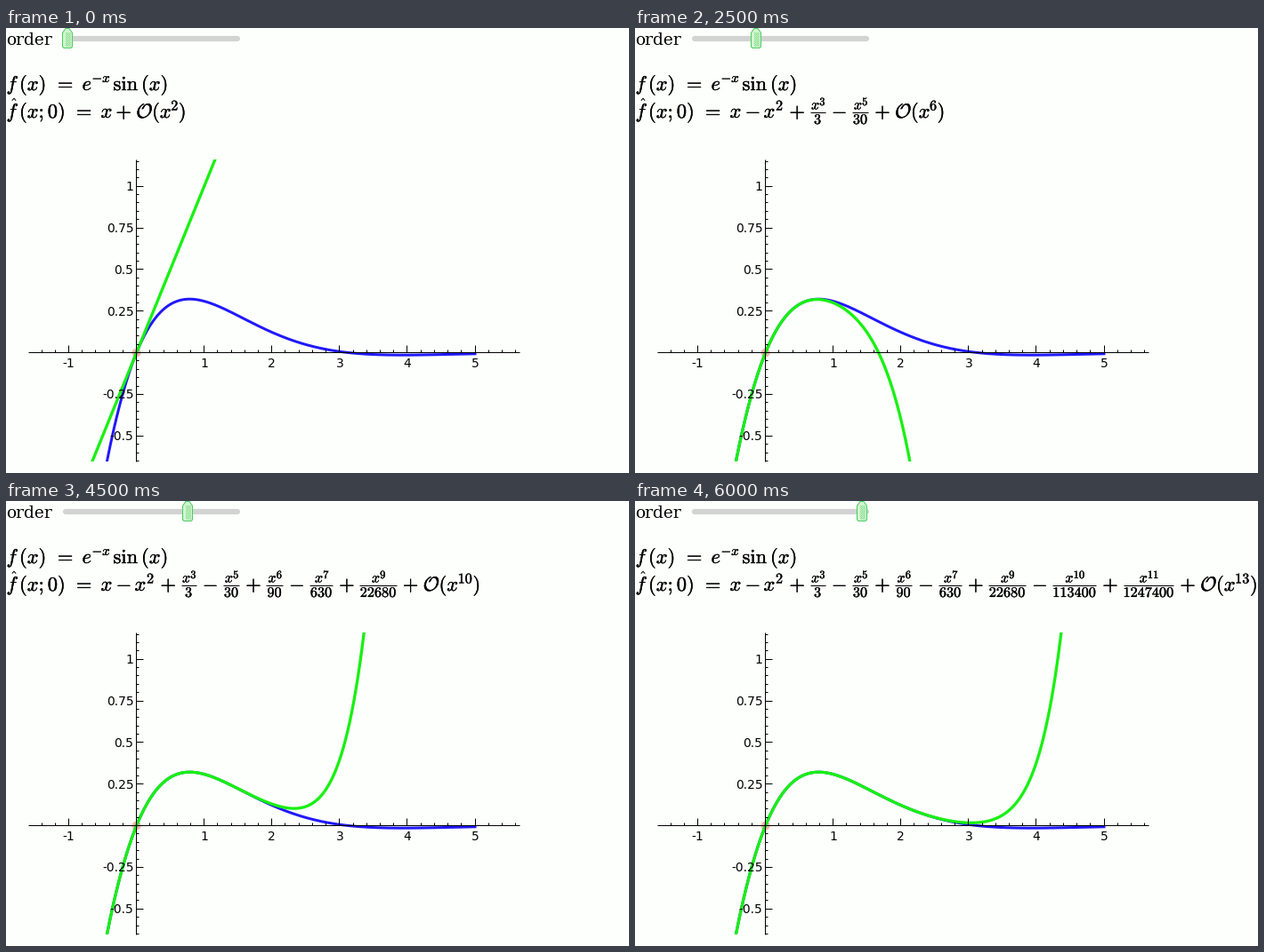
These frames come from a looping animation (700 by 501 pixels, 6.5 s). A matplotlib script:

```python
import math

import matplotlib.pyplot as plt
import numpy as np
from matplotlib.animation import FuncAnimation
from matplotlib.patches import Circle, Polygon, Rectangle
from matplotlib.patheffects import withStroke

W, H, DPI = 700, 501, 64
PT = 72 / DPI                      # points per pixel
BG, BLUE, GREEN, GREY = "#fdfffd", "#2018fb", "#18f012", "#d3d3d3"
X0, Y0, SX, SY = 146.6, 365.6, 76.08, 187.4
TOP, BOTTOM = 147.5, 488.5
EM, SCRIPT = 22.5, 16.2            # formula sizes in pixels
LINE1, LINE2 = 70, 101             # formula baselines

plt.rcParams["mathtext.fontset"] = "cm"
fig = plt.figure(figsize=(W / DPI, H / DPI), dpi=DPI, facecolor=BG)
ax = fig.add_axes([0, 0, 1, 1])
ax.set(xlim=(0, W), ylim=(H, 0))
ax.axis("off")

moving = []


def label(x, y, s, size, ha="left", font="DejaVu Sans"):
    return ax.text(x, y, s, size=size * PT, ha=ha, va="baseline",
                   color="black", family=font, zorder=5)


def math_text(x, y, s, size=EM, ha="left"):
    text = label(x, y, f"${s}$", size, ha)
    text.set_path_effects([withStroke(linewidth=0.35 * PT,
                                      foreground="black")])
    return text


def line(xs, ys, color="black", width=1, z=4, cap="butt"):
    return ax.plot(xs, ys, color=color, lw=width * PT, zorder=z,
                   solid_capstyle=cap)[0]


def rule(x1, y1, x2, y2):
    """Crisp one-pixel line through the pixels that hold both ends."""
    return line(np.floor([x1, x2]), np.floor([y1, y2]))


def px(x):
    return X0 + SX * x


def py(y):
    return Y0 - SY * y


def coef(n):
    """Taylor coefficient of exp(-x) sin(x) at 0."""
    a = 2 ** (n / 2) * math.sin(3 * math.pi * n / 4) / math.factorial(n)
    return a if abs(a) > 1e-12 else 0.0


def draw_curve(x, y, color, width, z):
    curve = line(px(x), py(y), color, width, z, "projecting")
    curve.set_clip_path(Rectangle((0, TOP), W, BOTTOM - TOP,
                                  transform=ax.transData))
    return curve


def draw_axes():
    rule(25, Y0, 577, Y0)
    rule(X0, 148, X0, 488)
    for k in range(-7, 29):
        x = px(k / 5)
        rule(x, Y0, x, Y0 - (8 if k % 5 == 0 else 3))
        if k % 5 == 0 and k:
            label(x, 381.5, str(k // 5), 13.89, "center")
    for k in range(-13, 24):
        y = py(k / 20)
        rule(X0, y, X0 + (8 if k % 5 == 0 else 3), y)
        if k % 5 == 0 and k:
            label(143.5, y + 5, f"{k / 20:g}", 13.89, "right")


def draw_static():
    label(0.5, 18.5, "order", 18.67, font="DejaVu Serif")
    ax.plot([66.5, 259.5], [11.5, 11.5], color=GREY, lw=6.2 * PT,
            solid_capstyle="round", zorder=1)

    math_text(0.5, LINE1, "f")
    math_text(15, LINE1, "(x)")
    math_text(65, LINE1, "=", ha="center")
    math_text(85.5, LINE1, "e")
    math_text(96.5, LINE1 - 9, "-x", 15)
    math_text(120.5, LINE1, r"\mathrm{sin}")
    math_text(152, LINE1, "(x)")

    math_text(0.5, LINE2, "f")
    math_text(15, LINE2, "(x;0)")
    line([6.8, 9, 11.2], [81.7, 79.2, 81.7])
    math_text(86, LINE2, "=", ha="center")
    math_text(106.5, LINE2, "x")

    ax.add_patch(Circle((X0, Y0), 5, fc="#ffb4ac", ec="none", zorder=2))
    draw_curve(XS, np.exp(-XS) * np.sin(XS), BLUE, 3, 3)
    draw_axes()


def draw_handle(order):
    left = int(63 + 16.95 * (order - 1))
    shape = [(0.5, 5.5), (4, 0.5), (8, 0.5), (11.5, 5.5),
             (11.5, 21), (10, 22.5), (2, 22.5), (0.5, 21)]
    body = Polygon([(left + x, y) for x, y in shape], fc="#d2f5d0",
                   ec="#48cc60", lw=PT, zorder=6)
    moving.append(ax.add_patch(body))
    dots = [(left + x + y % 2, y + 0.5)
            for y in range(4, 20) for x in (3.5, 5.5, 7.5)]
    moving.extend(ax.plot(*zip(*dots), ls="", marker="s", ms=0.9 * PT,
                          mew=0, color="#7fdc8a", zorder=7))


def draw_fraction(x, power, den):
    """Draw x^power / den and return its right edge."""
    width = max(17, 7.7 * len(den) + 3)
    mid = x + width / 2
    num = 9.2 + 6.2 * len(str(power))
    start = mid - num / 2
    moving.extend([
        math_text(start, 91.5, "x", 16),
        math_text(start + 9.2, 87, str(power), 12.5),
        rule(x, 95, x + width, 95),
        math_text(mid, 108, den, SCRIPT, "center"),
    ])
    return x + width


def draw_operator(end, sign):
    moving.append(math_text(end + 15.5, LINE2, sign, ha="center"))


def draw_series(order):
    end = 117
    for n in range(2, order + 1):
        a = coef(n)
        if not a:
            continue
        draw_operator(end, "+" if a > 0 else "-")
        if n == 2:
            moving.append(math_text(144.5, LINE2, "x"))
            moving.append(math_text(158, LINE2 - 8.5, "2", SCRIPT))
            end = 167
        else:
            end = draw_fraction(end + 30.2, n, str(round(1 / abs(a))))

    draw_operator(end, "+")
    power = str(order + 1)
    x = end + 29.2
    moving.extend([
        math_text(x, LINE2, r"\mathcal{O}(x"),
        math_text(x + 39, LINE2 - 8.5, power, SCRIPT),
        math_text(x + 39.3 + 8.3 * len(power), LINE2, ")"),
    ])


def update(i):
    for artist in moving:
        artist.remove()
    moving.clear()
    order = max(1, i)              # the first order is held twice as long
    draw_handle(order)
    draw_series(order)
    y = sum(coef(n) * XS ** n for n in range(1, order + 1))
    moving.append(draw_curve(XS, y, GREEN, 3.3, 3.5))
    return moving


XS = np.linspace(-1, 5, 400)
draw_static()
anim = FuncAnimation(fig, update, frames=13, interval=500,
                     init_func=lambda: update(0), repeat=True,
                     repeat_delay=0, blit=False)
plt.show()
```
